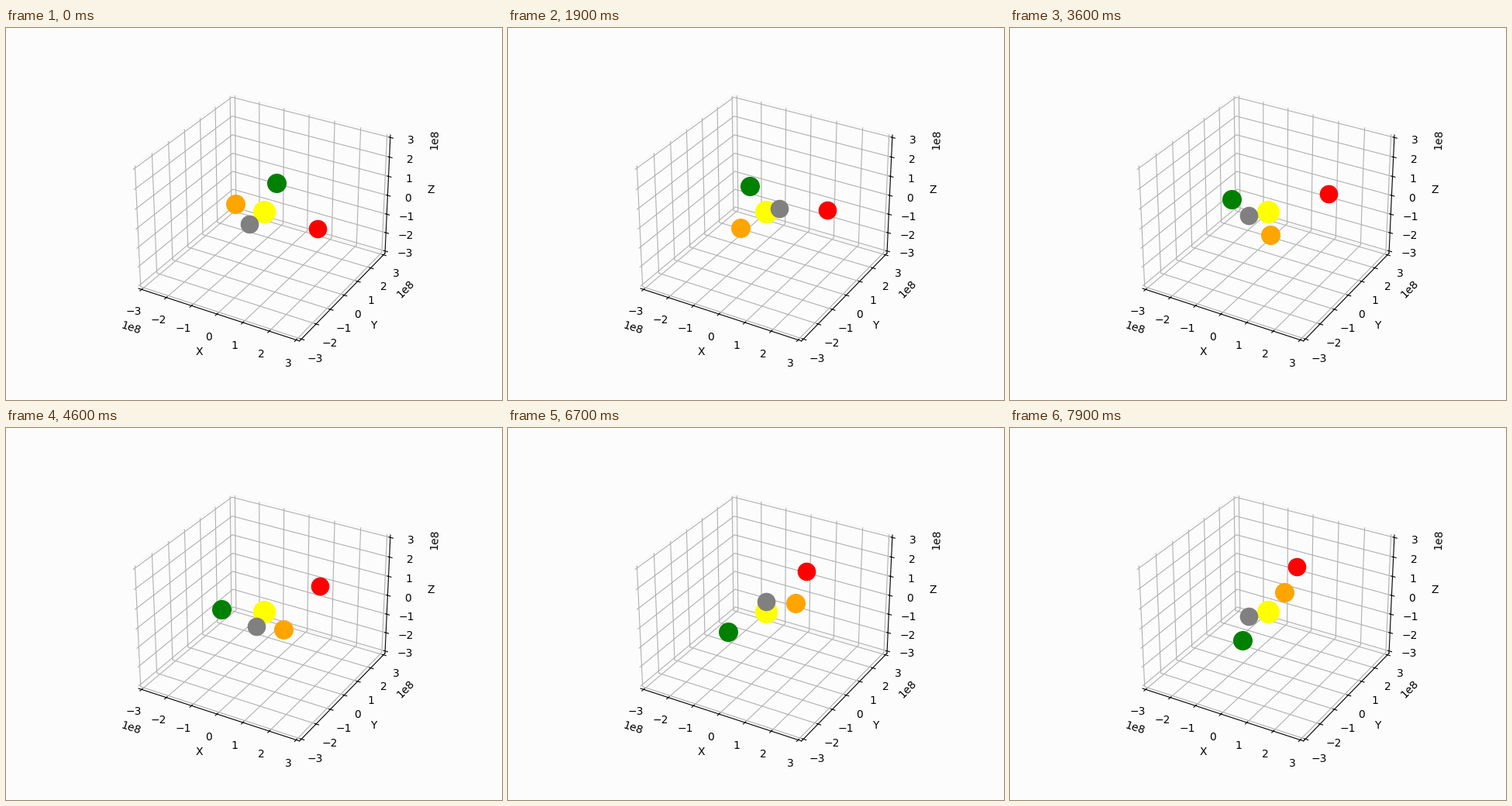
Write a matplotlib script that moves like this. It is 640 by 480 pixels and loops after 8 s.

```python
import matplotlib.pyplot as plt
import numpy as np
from matplotlib.animation import FuncAnimation
from matplotlib.ticker import MultipleLocator

FRAMES = 80
STEP = 365.25 / 175     # days per frame
START = -0.5            # midnight, half a day before the noon epoch
AU = 1.495979e8         # km
TILT = np.radians(23.44)
BACK = "#fcfcfc"

fig = plt.figure(figsize=(6.4, 4.8), dpi=100, facecolor=BACK)
ax = fig.add_subplot(projection="3d", facecolor=BACK)


class Planet:
    """A dot on a Kepler orbit: size in AU, angles in degrees at the epoch."""

    def __init__(self, color, dot, a, e, lon, peri, incl=0.0, node=0.0):
        self.a, self.e = a, e
        self.lon, self.peri, self.incl, self.node = np.radians([lon, peri, incl, node])
        self.rate = 2 * np.pi / 365.2564 / a ** 1.5
        self.line = draw_dot(color, dot)

    def position(self, day):
        m = self.lon + self.rate * day - self.peri
        ecc = m
        for _ in range(20):
            ecc = m + self.e * np.sin(ecc)
        u = np.cos(ecc) - self.e
        v = np.sqrt(1 - self.e ** 2) * np.sin(ecc)
        r = self.a * np.hypot(u, v)
        lon = np.arctan2(v, u) + self.peri
        lat = self.incl * np.sin(lon - self.node)
        # small shift of the star from the common centre of mass
        x = r * np.cos(lat) * np.cos(lon) - 0.0068
        y = r * np.cos(lat) * np.sin(lon) - 0.0033
        z = r * np.sin(lat)
        return AU * np.array([x,
                              y * np.cos(TILT) - z * np.sin(TILT),
                              y * np.sin(TILT) + z * np.cos(TILT)])

    def move(self, day):
        x, y, z = self.position(day)
        self.line.set_data_3d([x], [y], [z])


def draw_dot(color, size):
    return ax.plot([0], [0], [0], "o", color=color, markersize=size)[0]


draw_dot("yellow", 20)
planets = [
    Planet("gray", 16, a=0.3871, e=0.2056, lon=252.25, peri=77.46, incl=7.0, node=48.3),
    Planet("orange", 17, a=0.7233, e=0.0068, lon=181.98, peri=131.6, incl=3.4, node=76.7),
    Planet("green", 17, a=1.0, e=0.0167, lon=100.46, peri=102.94),
    Planet("red", 16, a=1.5237, e=0.0934, lon=355.45, peri=336.06, incl=1.85, node=49.6),
]

lim = 3e8 * 25 / 24
ax.set(xlim=(-lim, lim), ylim=(-lim, lim), zlim=(-lim, lim),
       xlabel="X", ylabel="Y", zlabel="Z")
for axis in (ax.xaxis, ax.yaxis, ax.zaxis):
    axis.set_major_locator(MultipleLocator(1e8))
    axis.pane.set_alpha(None)
    axis.pane.set_facecolor(BACK)
    axis.pane.set_edgecolor((0.95, 0.95, 0.95, 0.5))


def update(i):
    for planet in planets:
        planet.move(START + i * STEP)
    return [planet.line for planet in planets]


anim = FuncAnimation(fig, update, frames=FRAMES, interval=100,
                     repeat=True, repeat_delay=0, blit=False)
plt.show()
```
